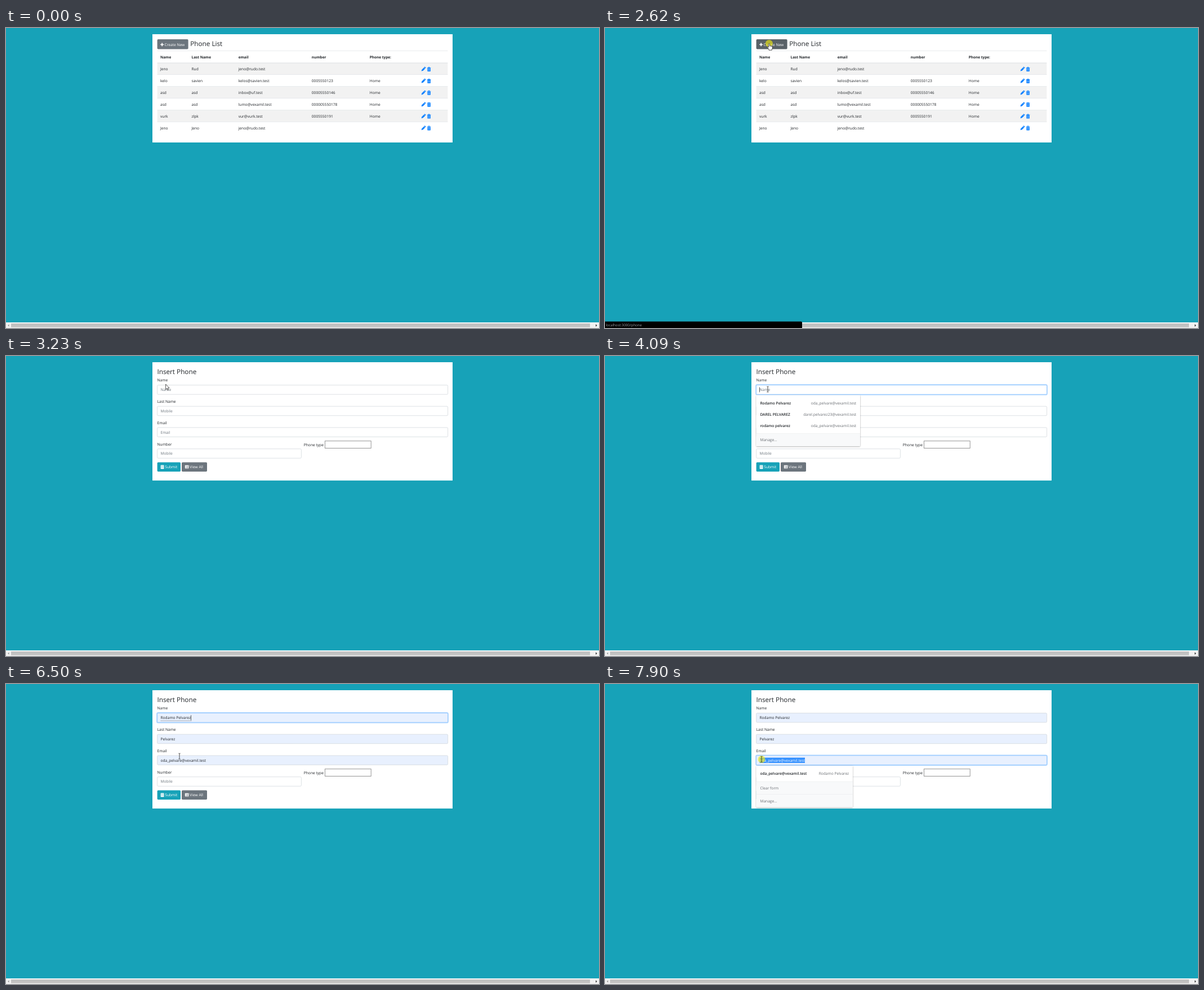
These frames come from a looping animation (1053x532 px, 8000 ms). An HTML page:

```html
<!DOCTYPE html>
<html lang="en">
<head>
<meta charset="utf-8">
<title>Phone List</title>
<style>
html, body { margin: 0; width: 100%; height: 100%; overflow: hidden; background: #17a2b8; }
svg { display: block; width: 1053px; height: 532px; }
text { font: 400 6.65px "Open Sans", "Noto Sans", sans-serif; fill: #212529; text-rendering: geometricPrecision; white-space: pre; }
.h { font-size: 11.75px; font-weight: 500; }
.b { font-size: 6.45px; font-weight: 700; }
.s { font-size: 6.6px; font-weight: 600; }
.w { fill: #fff; }
.g { fill: #6c757d; }
.m { fill: #6b6f74; }
.st { font-size: 6.3px; fill: #9aa0a6; }
</style>
</head>
<body>
<svg id="stage" viewBox="0 0 1053 532" xmlns="http://www.w3.org/2000/svg"></svg>
<script>
const LOOP = 8000;
const PERSON = 'Rodamo Pelvarez', FAMILY = 'Pelvarez', MAIL = 'oda_pelvare@vexamil.test';

const rect = (x, y, w, h, fill, more = '') =>
  `<rect x="${x}" y="${y}" width="${w}" height="${h}" fill="${fill}" ${more}/>`;
const text = (x, y, str, cls = '', more = '') =>
  `<text x="${x}" y="${y}" class="${cls}" ${more}>${str}</text>`;
const path = (d, fill, more = '') => `<path d="${d}" fill="${fill}" ${more}/>`;
const group = (id, body) => `<g id="${id}">${body}</g>`;
const END = 'text-anchor="end"';

// ---- list page ----
const cols = [274, 329.5, 412.7, 542.8, 645.8];
const people = [
  ['Jeno', 'Rud', 'jeno@rudo.test', '', ''],
  ['kelo', 'savien', 'kelos@savien.test', '0005550123', 'Home'],
  ['asd', 'asd', 'inbox@uf.test', '00005550146', 'Home'],
  ['asd', 'asd', 'lumo@vexamil.test', '000005550178', 'Home'],
  ['vurk', 'zlpk', 'vur@vurk.test', '0005550191', 'Home'],
  ['Jeno', 'Jeno', 'jeno@rudo.test', '', '']
];

const pencil = y => `<g transform="translate(741.2 ${y}) rotate(45)" fill="#007bff">` +
  rect(-1.5, -4.9, 3, 1.6, '#007bff', 'rx=".5"') + path('M-1.5-2.8H1.5V2.4L0 5.1L-1.5 2.4Z', '#007bff') +
  path('M-.5-1.8V2', 'none', 'stroke="#8fc4ff" stroke-width=".4"') + '</g>';
const trash = y => `<g transform="translate(751.1 ${y})">` +
  path('M-3.3-3.1H-1.3L-.9-4H.9L1.3-3.1H3.3V-2.2H-3.3Z', '#007bff') +
  path('M-2.8-1.8H2.8V3.3Q2.8 4-2.8+4H-2.1Q-2.8 4-2.8 3.3Z'.replace('Q2.8 4-2.8+4H-2.1', 'Q2.8 4 2.1 4H-2.1'), '#007bff') +
  path('M-1.4-.8V3M0-.8V3M1.4-.8V3', 'none', 'stroke="#cfe5ff" stroke-width=".5"') + '</g>';

function listPage() {
  let s = rect(260, 11, 533, 192, '#fff');
  s += rect(267.8, 19.3, 56.9, 18.9, 'none', 'id="btnRing" rx="2.4" stroke="#6c757d" stroke-opacity=".5" stroke-width="1.5"');
  s += rect(268.6, 20.1, 55, 17.3, '#6c757d', 'id="btn" rx="1.7"');
  s += path('M277.2 26.4V32.2M274.3 29.3H280.1', 'none', 'stroke="#fff" stroke-width="1.7"');
  s += text(281.5, 31.7, 'Create New', 'w') + text(327.2, 31.8, 'Phone List', 'h');
  s += rect(268.6, 40.2, 515.8, .7, '#dee2e6');
  ['Name', 'Last Name', 'email', 'number', 'Phone type:'].forEach((c, i) => s += text(cols[i], 54.1, c, 'b'));
  people.forEach((p, r) => {
    const y = 61.9 + r * 20.9;
    if (r % 2 === 0) s += rect(268.6, y, 515.8, 20.9, '#f2f2f2');
    s += rect(268.6, y - .4, 515.8, r ? .6 : 1, '#dee2e6');
    p.forEach((v, i) => { if (v) s += text(cols[i], y + 13.2, v); });
    s += pencil(y + 11.1) + trash(y + 11.1);
  });
  return s;
}

// ---- form page ----
const boxes = [[51.6, 516], [89.2, 516], [126.9, 516], [164.7, 255.8]];
const hints = ['Name', 'Mobile', 'Email', 'Mobile'];
const labels = ['Name', 'Last Name', 'Email', 'Number'];
const values = [PERSON, FAMILY, MAIL];

function field(i) {
  const [y, w] = boxes[i];
  let s = rect(267.9, y - .7, w + 1.2, 17.9, 'none', `id="ring${i}" rx="2.4" stroke="#007bff" stroke-opacity=".3" stroke-width="1.6"`);
  s += rect(268.6, y, w, 16.5, '#fff', `id="box${i}" rx="1.7" stroke="#ced4da" stroke-width=".7"`);
  s += text(274.5, y + 10.7, hints[i], 'g', `id="hint${i}"`);
  if (values[i]) s += text(274.5, y + 10.7, values[i], '', `id="val${i}"`);
  return s;
}

function formPage() {
  let s = rect(260, 11, 533, 209.8, '#fff') + text(268.4, 31.8, 'Insert Phone', 'h');
  [45.4, 83.2, 121, 158.6].forEach((y, i) => s += text(268.6, y, labels[i]) + field(i));
  s += text(528.8, 160.1, 'Phone type');
  s += rect(566.4, 150.7, 81.8, 12.8, '#fff', 'stroke="#8a8a8a" stroke-width=".9"');
  s += rect(268.6, 188.4, 41.4, 16.6, '#17a2b8', 'rx="1.7"') + text(282.3, 199.3, 'Submit', 'w');
  s += rect(274.6, 193.4, 6, 6.8, '#fff', 'rx="1"') + path('M274.6 195.3H280.6M274.6 197.6H280.6', 'none', 'stroke="#17a2b8" stroke-width=".5"');
  s += rect(312, 188.4, 45, 16.6, '#6c757d', 'rx="1.7"') + text(326.3, 199.3, 'View All', 'w');
  s += rect(317.8, 193.8, 6.8, 5.8, '#fff', 'rx=".8"') +
    path('M318.6 195.7H319.4M320.2 195.7H323.9M318.6 197H319.4M320.2 197H323.9M318.6 198.4H319.4M320.2 198.4H323.9', 'none', 'stroke="#6c757d" stroke-width=".6"');
  s += path('M274.6 65.2H329.8', 'none', 'id="spell" stroke="#555" stroke-width=".6" stroke-dasharray="1.4 .5"');
  s += rect(0, 130.6, 0, 9.4, '#3390ff', 'id="sel"');
  s += text(274.5, 137.6, MAIL, 'w', 'id="selText" clip-path="url(#selClip)"');
  s += rect(0, 0, .7, 9, '#222', 'id="caret"');
  return s;
}

// ---- autofill menus ----
const menu = (y, w, h) => rect(268.6, y, w, h, '#fff', 'rx="1" filter="url(#shade)"');
function namePopup() {
  let s = menu(69.6, 184.4, 90.2) + rect(268.6, 73.6, 184.4, 19.8, '#e8e8ea', 'id="hot"');
  const rows = [[PERSON, MAIL], ['DAREL PELVAREZ', 'darel.pelvarez23@vexamil.test'], [PERSON.toLowerCase(), MAIL]];
  rows.forEach(([a, b], i) => {
    const y = 86 + i * 19.8;
    s += text(275.4, y, a, 's') + text(446.2, y, b, 'm', END);
  });
  return s + rect(268.6, 137.6, 184.4, 22.2, '#f8f9fa') + rect(268.6, 137.4, 184.4, .5, '#e4e6e8') + text(275.4, 151.4, 'Manage...', 'm');
}
function mailPopup() {
  let s = menu(145, 171.2, 73.2) + text(275.4, 161.4, MAIL, 's') + text(433.2, 161.4, PERSON, 'm', END);
  s += rect(268.6, 173, 171.2, 45.2, '#f8f9fa');
  s += rect(268.6, 172.8, 171.2, .5, '#e4e6e8') + rect(268.6, 195.4, 171.2, .5, '#e4e6e8');
  return s + text(275.4, 187.1, 'Clear form', 'm') + text(275.4, 209.7, 'Manage...', 'm');
}

const scrollbar = rect(0, 522.4, 1053, 9.6, '#f1f1f1') + rect(0, 522.2, 1053, .9, '#fff') +
  rect(9, 524, 1028, 6.6, '#c1c1c1') +
  path('M5.4 525.5V529.5L3.3 527.5Z', '#8a8a8a') + path('M1047.2 525.3V529.7L1049.6 527.5Z', '#333');
const statusBar = path('M0 520.4H348Q350 520.4 350 522.4V532H0Z', '#000') + text(1.5, 528.7, 'localhost:3000/phone', 'st');

const outline = 'stroke="#111" stroke-width=".7" stroke-linejoin="round"';
const pointers =
  group('arrow', path('M0 0V9.3L2.1 7.4L3.6 10.7L5 10L3.6 6.8H6.5Z', '#fff', outline)) +
  group('hand', path('M-1 .8Q0-.8 1 .8V4Q2.2 3.2 2.9 4.4Q4 3.8 4.5 4.9Q5.8 4.6 5.9 5.8V8.2Q5.7 9.6 4.9 10.4V11.8H-.4V10.6L-3 7Q-3.2 5.6-2 5.9L-1 6.9Z', '#fff', outline) +
    path('M1 4V6M2.9 4.5V6.2M4.5 5V6.4', 'none', 'stroke="#111" stroke-width=".4"')) +
  group('ibeam', path('M-1.6-4.9H-.4L0-4.5L.4-4.9H1.6M0-4.5V4.5M-1.6 4.9H-.4L0 4.5L.4 4.9H1.6', 'none', 'stroke="#222" stroke-width=".8"'));

document.getElementById('stage').innerHTML =
  `<defs><filter id="shade" x="-5%" y="-5%" width="110%" height="115%"><feDropShadow dx="0" dy=".8" stdDeviation=".9" flood-opacity=".4"/></filter>
  <clipPath id="selClip"><rect id="selArea" y="126" width="0" height="18"/></clipPath></defs>` +
  rect(0, 0, 1053, 532, '#17a2b8') + group('list', listPage()) + group('form', formPage()) +
  group('names', namePopup()) + group('mails', mailPopup()) + scrollbar + group('status', statusBar) +
  '<circle id="click" r="6.5" fill="#f2ee10" fill-opacity=".62"/>' + group('pointer', pointers);

// ---- motion ----
const $ = id => document.getElementById(id);
const show = (id, on) => $(id).setAttribute('display', on ? 'inline' : 'none');
const set = (id, attrs) => { for (const k in attrs) $(id).setAttribute(k, attrs[k]); };
const within = (t, a, b) => t >= a && t < b;
const ramp = (t, a, d) => Math.max(0, Math.min(1, (t - a) / d));

// each move: first step, last step, number of steps, way points
const moves = [
  [130, 820, 10, [[1035, 570], [941, 468], [680, 260], [440, 150], [368, 118], [401, 129]]],
  [990, 1520, 8, [[401, 129], [350, 88], [302, 42], [292, 28]]],
  [2620, 2620, 1, [[292, 28], [291.4, 27.4]]],
  [3070, 3230, 3, [[291.4, 27.4], [283.6, 50]]],
  [3300, 3770, 7, [[283.6, 50], [287, 56], [289, 59]]],
  [4240, 4410, 3, [[289, 59], [292.2, 76.5]]],
  [4560, 4560, 1, [[292.2, 76.5], [292.4, 78.2]]],
  [6120, 6500, 6, [[292.4, 78.2], [302, 105], [308, 128]]],
  [6580, 6900, 5, [[308, 128], [334, 165], [357, 137]]],
  [6970, 7750, 11, [[357, 137], [357, 137], [352, 137], [328, 137]]],
  [7830, 7900, 2, [[328, 137], [278, 133.5]]]
];

function pointerAt(t) {
  let m = moves[0];
  for (const c of moves) if (t >= c[0]) m = c;
  const [a, b, n, pts] = m;
  if (t < a) return pts[0];
  const gap = n > 1 ? (b - a) / (n - 1) : 1;
  const p = Math.min(n, Math.floor((t - a) / gap + .01) + 1) / n * (pts.length - 1);
  const i = Math.min(pts.length - 2, Math.floor(p)), f = p - i;
  return [0, 1].map(k => pts[i][k] + (pts[i + 1][k] - pts[i][k]) * f);
}

function pointerKind(t, x, y) {
  if (t < 3070) return t > 990 && y < 37.5 && x < 323.6 ? 'hand' : 'arrow';
  if (t >= 6970) return 'ibeam';
  if (within(t, 4015, 6120) && y > 70) return 'arrow';
  return boxes.some(([top, w]) => y > top && y < top + 16.5 && x < 268.6 + w) ? 'ibeam' : 'arrow';
}

function draw(t) {
  const [x, y] = pointerAt(t);
  const kind = pointerKind(t, x, y);
  const form = t >= 2770;
  show('list', !form);
  show('form', form);
  set('btn', { fill: kind === 'hand' ? '#5a6268' : '#6c757d' });
  show('btnRing', t >= 2700);
  set('status', { opacity: t < 1680 || t >= 3150 ? 0 : t < 1750 || t >= 3070 ? .5 : 1 });

  const preview = t >= 4330, filled = t >= 6120;
  const focus = [ramp(t, 3900, 150) * (1 - ramp(t, 6930, 150)), 0, ramp(t, 6930, 150), 0];
  boxes.forEach((_, i) => {
    const auto = preview && i < 3;
    set('ring' + i, { opacity: focus[i] });
    set('box' + i, { fill: auto ? '#e8f0fe' : '#fff', stroke: focus[i] > .5 ? '#80bdff' : '#ced4da' });
    show('hint' + i, !auto);
    if (i < 3) show('val' + i, auto);
  });
  show('spell', within(t, 6300, 6970));
  show('names', within(t, 4015, 6120));
  show('hot', t >= 4330);
  show('mails', t >= 7120);

  const nameEnd = 274.5 + $('val0').getComputedTextLength();
  const mailEnd = 274.5 + $('val2').getComputedTextLength();
  const from = Math.max(274.5, Math.min(mailEnd, x < 282 ? 274.5 : x));
  const selecting = t >= 6970 && from < mailEnd - 1;
  const span = { x: from, width: Math.max(0, mailEnd - from) };
  show('sel', selecting);
  show('selText', selecting);
  set('sel', span);
  set('selArea', span);

  const blink = within(t, 3940, 4870) || within(t, 5420, 5950) || within(t, 6120, 6650) || (t >= 6970 && !selecting);
  show('caret', blink);
  set('caret', { x: t >= 6970 ? mailEnd : filled ? nameEnd : 274.1, y: t >= 6970 ? 130.8 : 55.3 });

  show('click', within(t, 2620, 2850) || within(t, 3940, 4090) || within(t, 5950, 6195) || t >= 6970);
  set('click', { cx: x, cy: y });
  show('pointer', t >= 130);
  set('pointer', { transform: `translate(${x} ${y})` });
  for (const k of ['arrow', 'hand', 'ibeam']) show(k, k === kind);
}

let start;
function tick(now) {
  if (start === undefined) start = now;
  draw((now - start) % LOOP);
  requestAnimationFrame(tick);
}
draw(0);
requestAnimationFrame(tick);
</script>
</body>
</html>
```
